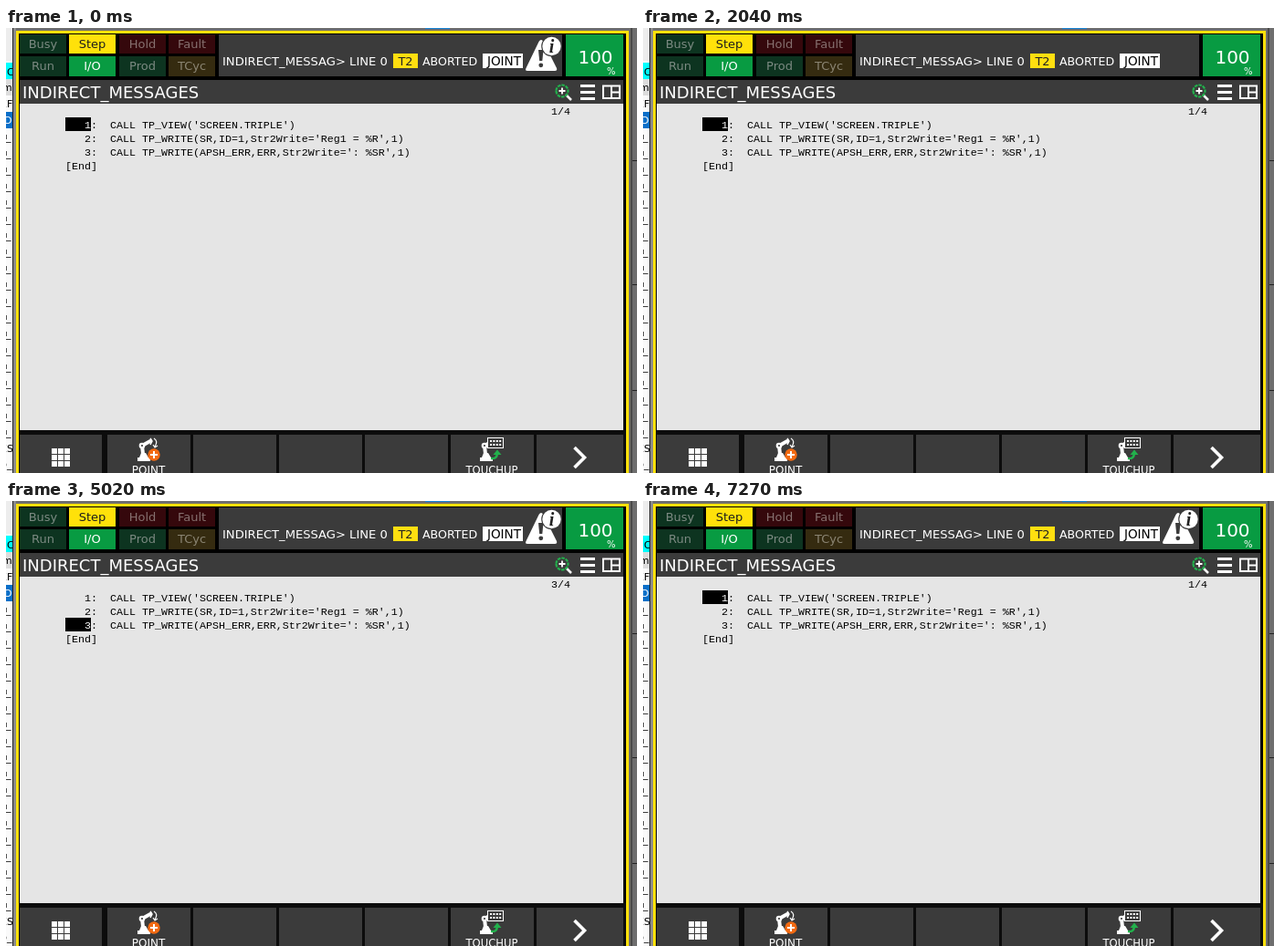
Write an HTML page with a canvas that moves like this. It is 691 px wide and 488 px high and loops after 8 s.

```html
<!DOCTYPE html>
<html lang="en">
<head>
<meta charset="utf-8">
<title>Teach pendant</title>
<style>
html, body { margin: 0; width: 100%; height: 100%; overflow: hidden; background: #000; }
canvas { display: block; }
</style>
</head>
<body>
<canvas id="stage" width="691" height="488"></canvas>
<script>
const ctx = document.getElementById('stage').getContext('2d');
const LOOP = 8000;
const SANS = '"DejaVu Sans", Verdana, sans-serif';
const MONO = '"Liberation Mono", "Courier New", monospace';
const PANEL = '#3b3b3b', PAPER = '#e5e5e5', YELLOW = '#ffe10a', GREEN = '#089b42', WHITE = '#fff', BLACK = '#000';

const BLINKS = [70, 1050, 2040, 3040, 4030, 5020, 6010, 7000];
const CURSOR = [[0, 1], [2110, 2], [3500, 3], [7070, 2], [7270, 1]];
const CODE = [
  "CALL TP_VIEW('SCREEN.TRIPLE')",
  "CALL TP_WRITE(SR,ID=1,Str2Write='Reg1 = %R',1)",
  "CALL TP_WRITE(APSH_ERR,ERR,Str2Write=': %SR',1)"
];
const LAMPS = [
  ['Busy', '#0d3420', '#7c8a82'], ['Step', YELLOW, '#1c1c1c'], ['Hold', '#35080c', '#86706f'], ['Fault', '#35080c', '#86706f'],
  ['Run', '#0d3420', '#7c8a82'], ['I/O', GREEN, WHITE], ['Prod', '#0d3420', '#7c8a82'], ['TCyc', '#352b10', '#8a8472']
];

function box(x, y, w, h, color) {
  ctx.fillStyle = color;
  ctx.fillRect(x, y, w, h);
}

function text(str, x, y, size, color, align = 'left', family = SANS, style = '') {
  ctx.font = `${style} ${size}px ${family}`;
  ctx.textAlign = align;
  ctx.fillStyle = color;
  ctx.fillText(str, x, y);
}

const mono = (str, x, y, color = BLACK) => text(str, x, y, 11.667, color, 'left', MONO);

function disc(x, y, r, color) {
  ctx.fillStyle = color;
  ctx.beginPath();
  ctx.arc(x, y, r, 0, Math.PI * 2);
  ctx.fill();
}

function shape(d, color) {
  ctx.fillStyle = color;
  ctx.fill(new Path2D(d));
}

function line(d, color, width, cap = 'butt') {
  ctx.strokeStyle = color;
  ctx.lineWidth = width;
  ctx.lineCap = cap;
  ctx.lineJoin = cap === 'round' ? 'round' : 'miter';
  ctx.stroke(new Path2D(d));
}

// Slivers of the windows behind the pendant
function backdrop() {
  box(0, 0, 691, 488, '#6e6e6e');
  box(0, 0, 7, 488, '#fafafa');
  box(7, 0, 1, 488, '#222');
  box(8, 0, 3, 488, '#8a8a8a');
  box(0, 0, 7, 36, '#ededed');
  box(0, 38, 7, 18, '#0ff');
  box(0, 56, 7, 18, '#dcdcdc');
  box(0, 92, 7, 18, '#0a6fc8');
  ctx.save();
  ctx.beginPath();
  ctx.rect(0, 0, 7, 488);
  ctx.clip();
  text('C', 1, 52, 11, BLACK);
  text('m', -4, 69, 11, BLACK);
  text('EF', -6, 87, 11, BLACK);
  text('D', -2, 105, 11, WHITE);
  for (let y = 123; y < 460; y += 18) {
    text('_', 0, y, 11, BLACK);
    box(0, y - 6, 1, 5, '#555');
  }
  text('ES', -6, 465, 11, BLACK);
  text('p_', -6, 482, 11, BLACK);
  ctx.restore();
  for (const y of [145, 281, 397]) box(686, y, 5, 1, '#222');
  box(684, 0, 2, 488, '#4a4a4a');
  box(459, 0, 27, 1, '#1583d8');
}

function header() {
  box(11, 3, 671, 490, YELLOW);
  box(14, 6, 665, 482, BLACK);
  LAMPS.forEach(([label, fill, ink], i) => {
    const x = 15 + Math.round(i % 4 * 54.4), y = i < 4 ? 7 : 31;
    box(x, y, 51, i < 4 ? 21 : 22, fill);
    text(label, x + 25.5, y + 15, 13, ink, 'center');
  });
  box(233, 7, 376, 46, PANEL);
  text('INDIRECT_MESSAG> LINE 0', 237, 41, 13.1, WHITE);
  box(424, 28, 27, 16, '#ffdf10');
  text('T2', 437.5, 41, 13, '#222', 'center');
  text('ABORTED', 456, 41, 12.6, WHITE);
  box(522, 28, 44, 16, WHITE);
  text('JOINT', 545.5, 41, 13.6, BLACK, 'center');
  box(613, 7, 63, 46, GREEN);
  text('100', 645.5, 39, 20, WHITE, 'center');
  text('%', 658, 51, 10, WHITE);
}

function titleBar() {
  box(15, 57, 661, 26, PANEL);
  text('INDIRECT_MESSAGES', 18, 77, 18, WHITE);
  line('M613.5 73.5L619 79', WHITE, 2.5);
  ctx.setLineDash([3.5, 1]);
  line('M602.5 69a6.5 6.5 0 1 0 13 0a6.5 6.5 0 1 0 -13 0', '#22b14c', 2.2);
  ctx.setLineDash([]);
  line('M605.5 69h7M609 65.5v7', WHITE, 1.8);
  for (const y of [62, 69, 76]) box(629, y, 16, 3, WHITE);
  line('M654 63.5H672V77H654ZM663 63.5V77M663 70.5H672', WHITE, 2);
}

// Robot arm with its origin at the left end of the foot
function robot(x, y) {
  ctx.save();
  ctx.translate(x, y);
  shape('M0 0V-4H2L4 -9H9L12 -4H14V0Z', WHITE);
  line('M6 -8L5 -17L14 -22', WHITE, 4, 'round');
  disc(5, -17, 3.3, WHITE);
  disc(5, -17, 1.1, PANEL);
  line('M14 -25L16 -22L14 -18', WHITE, 1.5);
  ctx.restore();
}

function softKeys() {
  box(14, 441, 665, 47, '#0c0c0c');
  for (let i = 0; i < 7; i++) {
    const x = i ? 17 + i * 94 : 15;
    box(x, 446, i === 6 ? 95 : i ? 91 : 90, 42, PANEL);
  }
  for (let i = 0; i < 9; i++) box(50 + i % 3 * 7, 461 + Math.floor(i / 3) * 7, 6, 6, WHITE);

  robot(144, 475);
  line('M162 450Q167 453 163 459M161 457L163 460L166 458', WHITE, 1.2);
  disc(162, 468, 6.7, '#f26a12');
  line('M158 468h8M162 464v8', WHITE, 2);
  text('POINT', 156, 489, 12, WHITE, 'center');

  robot(519, 475);
  box(527, 449, 18, 12, WHITE);
  box(528, 450, 16, 10, PANEL);
  for (let i = 0; i < 8; i++) box(530 + i % 4 * 3.4, 452 + Math.floor(i / 4) * 4, 2, 2, WHITE);
  line('M531 472Q538 473 538 466', '#22b14c', 2.4);
  shape('M533.5 468L538 462.5L542.5 468Z', '#22b14c');
  text('TOUCHUP', 532, 489, 11.6, WHITE, 'center');

  line('M622.5 460L633.5 471L622.5 482', WHITE, 3.6);
}

function program(row) {
  box(15, 83, 661, 358, PAPER);
  mono(row + '/4', 597, 95);
  CODE.forEach((code, i) => {
    const n = i + 1, y = 110 + i * 15, active = n === row;
    if (active) box(65, y - 12, 28, 15, BLACK);
    mono(n, 86, y, active ? WHITE : BLACK);
    mono(':  ' + code, 93, y);
  });
  mono('[End]', 65, 155);
}

function warning() {
  shape('M583.5 15Q586 11 588.5 15L603 44Q604 47 601 47H571Q568 47 569.5 44Z', WHITE);
  shape('M583 24H588.5L587.3 36H584.2Z', PANEL);
  disc(585.8, 40.8, 2.4, PANEL);
  disc(597.5, 20, 11.3, PANEL);
  disc(597.5, 20, 10.2, WHITE);
  text('i', 597.5, 27, 20, '#222', 'center', '"Liberation Serif", serif', 'italic bold');
}

function draw(t) {
  const row = CURSOR.filter(([at]) => t >= at).pop()[1];
  const lit = BLINKS.filter(at => t >= at).length % 2 === 0;
  backdrop();
  header();
  titleBar();
  program(row);
  softKeys();
  if (lit) warning();
}

const start = performance.now();
function tick() {
  draw((performance.now() - start) % LOOP);
  requestAnimationFrame(tick);
}
tick();
</script>
</body>
</html>
```
